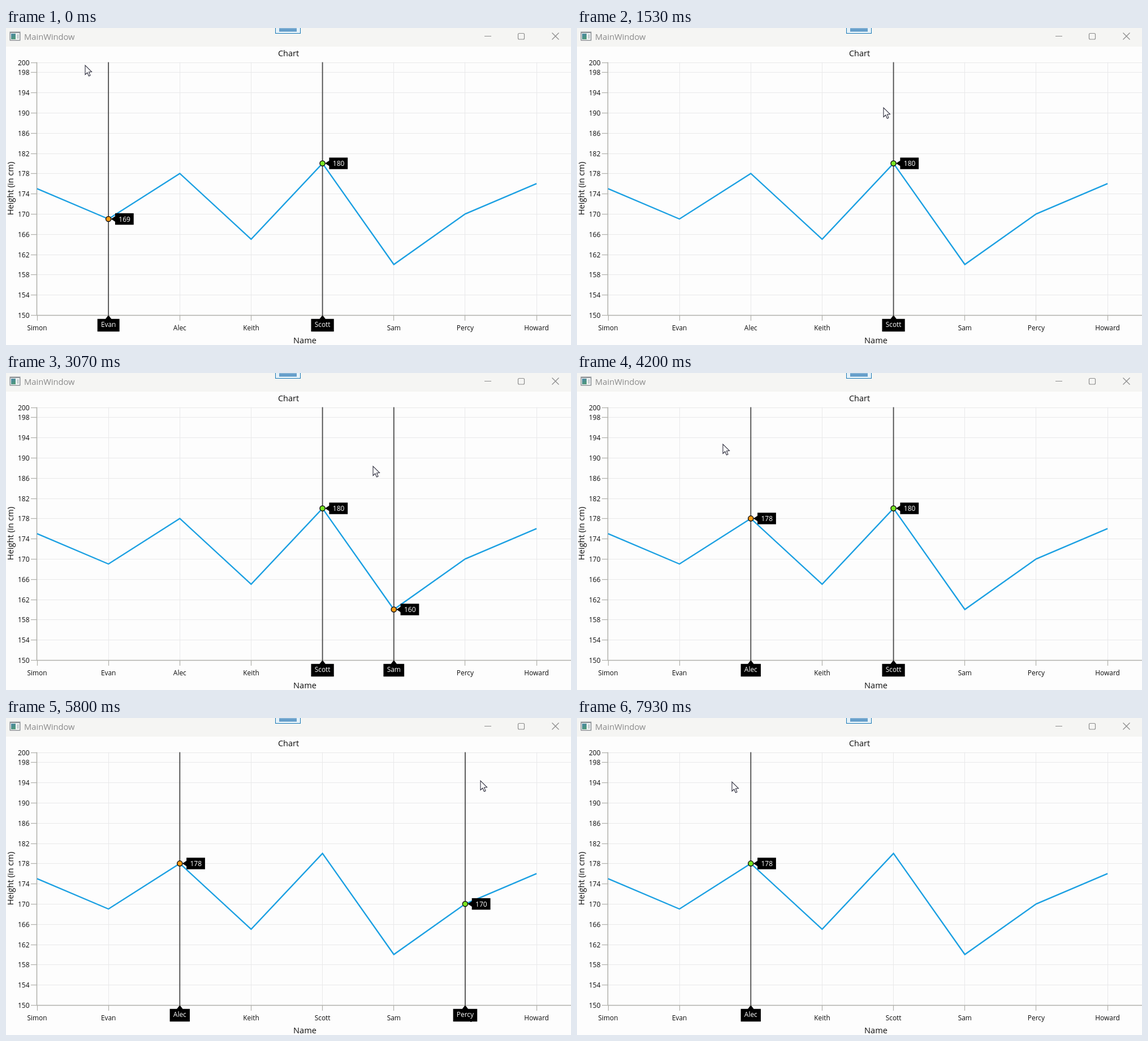
An HTML page with a canvas that plays this animation: 999x561 px, repeating every 8 s.

```html
<!DOCTYPE html>
<html lang="en">
<head>
<meta charset="utf-8">
<title>Chart</title>
<style>
  html, body { margin: 0; width: 100%; height: 100%; overflow: hidden; background: #fdfdfd; }
  canvas { display: block; width: 999px; height: 561px; }
</style>
</head>
<body>
<canvas id="stage" width="999" height="561"></canvas>
<script>
const ctx = document.getElementById('stage').getContext('2d');
const LOOP = 8000, STEP = 1000 / 15;
const LEFT = 55, TOP = 60.6, BOTTOM = 508, GAP = 126.15;
const FONT = '"Open Sans", "Noto Sans", sans-serif';

const people = [
  ['Simon', 175], ['Evan', 169], ['Alec', 178], ['Keith', 165],
  ['Scott', 180], ['Sam', 160], ['Percy', 170], ['Howard', 176]
];

// Pointer stops: step, x, y
const path = [
  [0, 140, 66], [15, 449, 112], [34, 638, 167], [42, 690, 168], [63, 258, 126],
  [76, 560, 118], [87, 839, 111], [104, 299, 109], [119, 274, 113]
];
const ORANGE_DROP = 63, GREEN_GRAB = 76;

const xAt = i => LEFT + i * GAP;
const yAt = v => TOP + (200 - v) * (BOTTOM - TOP) / 50;
const nearest = x => Math.max(0, Math.min(people.length - 1, Math.round((x - LEFT) / GAP)));

function slope(i, axis) {
  if (i === 0 || i === path.length - 1) return 0;
  const rate = k => (path[k + 1][axis] - path[k][axis]) / (path[k + 1][0] - path[k][0]);
  const a = rate(i - 1), b = rate(i);
  return a * b > 0 ? 2 * a * b / (a + b) : 0;
}

// Monotone cubic through the stops
function pointer(step, axis) {
  let i = 0;
  while (i < path.length - 2 && step > path[i + 1][0]) i++;
  const a = path[i], b = path[i + 1], span = b[0] - a[0];
  const u = Math.min(1, (step - a[0]) / span), u2 = u * u, u3 = u2 * u;
  return (2 * u3 - 3 * u2 + 1) * a[axis] + (u3 - 2 * u2 + u) * span * slope(i, axis)
       + (3 * u2 - 2 * u3) * b[axis] + (u3 - u2) * span * slope(i + 1, axis);
}

function line(x1, y1, x2, y2, color, width = 1) {
  ctx.strokeStyle = color;
  ctx.lineWidth = width;
  ctx.beginPath();
  ctx.moveTo(x1, y1);
  ctx.lineTo(x2, y2);
  ctx.stroke();
}

function rect(x, y, w, h, color) {
  ctx.fillStyle = color;
  ctx.fillRect(x, y, w, h);
}

function shape(points) {
  ctx.beginPath();
  points.forEach(([x, y]) => ctx.lineTo(x, y));
  ctx.closePath();
}

function text(str, x, y, size, color = '#0c0c0c', align = 'center', weight = 400) {
  ctx.font = `${weight} ${size}px ${FONT}`;
  ctx.textAlign = align;
  ctx.fillStyle = color;
  ctx.fillText(str, x, y);
}

function drawWindow() {
  rect(0, 0, 999, 561, '#fdfdfd');
  rect(0, 0, 999, 33, '#f5f5f3');

  rect(6.5, 6.5, 19, 16, '#8d9296');
  rect(8, 9, 16, 12, '#f8fafa');
  const tint = ctx.createLinearGradient(9, 10, 16, 20);
  tint.addColorStop(0, '#4a86a8');
  tint.addColorStop(1, '#4f9a72');
  rect(9, 10, 8, 10, tint);
  rect(19, 11, 4, 8, '#c9d2d4');
  text('MainWindow', 32, 20.5, 14.7, '#8a8a8a', 'left');

  rect(476, -1, 45, 11, '#1777b4');
  rect(477, 0, 43, 9, '#e6f2f9');
  rect(483, 1, 31, 2, '#2d79b5');
  rect(483, 4, 31, 2, '#2d79b5');

  const gray = '#8c8c8c';
  line(846, 14.5, 858, 14.5, gray);
  ctx.lineWidth = 1.2;
  ctx.beginPath();
  ctx.roundRect(905.5, 9.5, 11, 10.5, 2);
  ctx.stroke();
  line(965.5, 8.5, 977.5, 20.5, gray, 1.2);
  line(977.5, 8.5, 965.5, 20.5, gray, 1.2);
}

function drawAxes() {
  const grid = '#e9e9ea', axis = '#b0b0aa';
  const ticks = [200];
  for (let v = 198; v >= 150; v -= 4) ticks.push(v);
  for (const v of ticks) {
    const y = Math.round(yAt(v)) + .5;
    line(55, y, 999, y, grid);
    line(44, y, 54, y, axis, 1.2);
    text(v, 41.5, y + 4, 12, undefined, 'right');
  }
  people.forEach(([name], i) => {
    const x = Math.floor(xAt(i)) + .5;
    if (i) line(x, TOP, x, BOTTOM, grid);
    line(x, 509, x, 518, axis, 1.2);
    text(name, xAt(i), 535.2, 11.9);
  });
  line(54.5, TOP, 54.5, 509, axis, 1.5);
  line(54, 508.5, 999, 508.5, axis, 1.5);

  text('Chart', 499.5, 50, 14.5);
  text('Name', 528.5, 557.7, 14.6);
  ctx.save();
  ctx.translate(13, 284);
  ctx.rotate(-Math.PI / 2);
  text('Height (in cm)', 0, 0, 14.7);
  ctx.restore();
}

function drawSeries() {
  ctx.strokeStyle = '#1ba0e2';
  ctx.lineWidth = 2.4;
  ctx.lineJoin = 'miter';
  ctx.beginPath();
  people.forEach(([, v], i) => ctx.lineTo(xAt(i), yAt(v)));
  ctx.stroke();
}

function drawTrackball(i, color) {
  const [name, value] = people[i];
  const x = xAt(i), y = yAt(value);
  line(x, TOP, x, BOTTOM, '#4a4a4a', 1.8);

  ctx.font = '500 11.9px ' + FONT;
  const w = ctx.measureText(name).width + 12.5;
  rect(x - w / 2, 514.8, w, 22.4, '#000');
  shape([[x, 508], [x + 6, 516], [x - 6, 516]]);
  ctx.fill();
  text(name, x, 529.2, 11.9, '#fff', 'center', 500);

  rect(x + 11.8, y - 10.2, 32.8, 20.4, '#000');
  shape([[x + 4.5, y], [x + 13, y - 5.5], [x + 13, y + 5.5]]);
  ctx.fill();
  text(value, x + 28.5, y + 4.6, 12, '#fff', 'center', 500);

  ctx.beginPath();
  ctx.arc(x, y, 4.6, 0, 7);
  ctx.fillStyle = color;
  ctx.fill();
  ctx.strokeStyle = '#111';
  ctx.lineWidth = 1.5;
  ctx.stroke();
}

function drawPointer(x, y) {
  ctx.save();
  ctx.translate(Math.round(x), Math.round(y));
  shape([[0, 0], [0, 16.5], [3.8, 13], [6.4, 19], [9, 17.9], [6.5, 12], [11.5, 11.6]]);
  ctx.fillStyle = '#fff';
  ctx.fill();
  ctx.strokeStyle = '#2c2c3c';
  ctx.lineWidth = 1.1;
  ctx.stroke();
  ctx.restore();
}

function draw(ms) {
  const step = Math.min(119, Math.floor((ms % LOOP + 4) / STEP));
  const x = pointer(step, 1), y = pointer(step, 2);
  const orange = nearest(pointer(Math.min(step, ORANGE_DROP), 1));
  const green = step < GREEN_GRAB ? 4 : nearest(x);
  drawWindow();
  drawAxes();
  drawSeries();
  // Where both rest on one point only the front one shows
  if (orange !== green) drawTrackball(orange, '#f99a14');
  drawTrackball(green, '#78e622');
  drawPointer(x, y);
}

let start;
function tick(now) {
  start ??= now;
  draw(now - start);
  requestAnimationFrame(tick);
}
draw(0);
requestAnimationFrame(tick);
</script>
</body>
</html>
```
